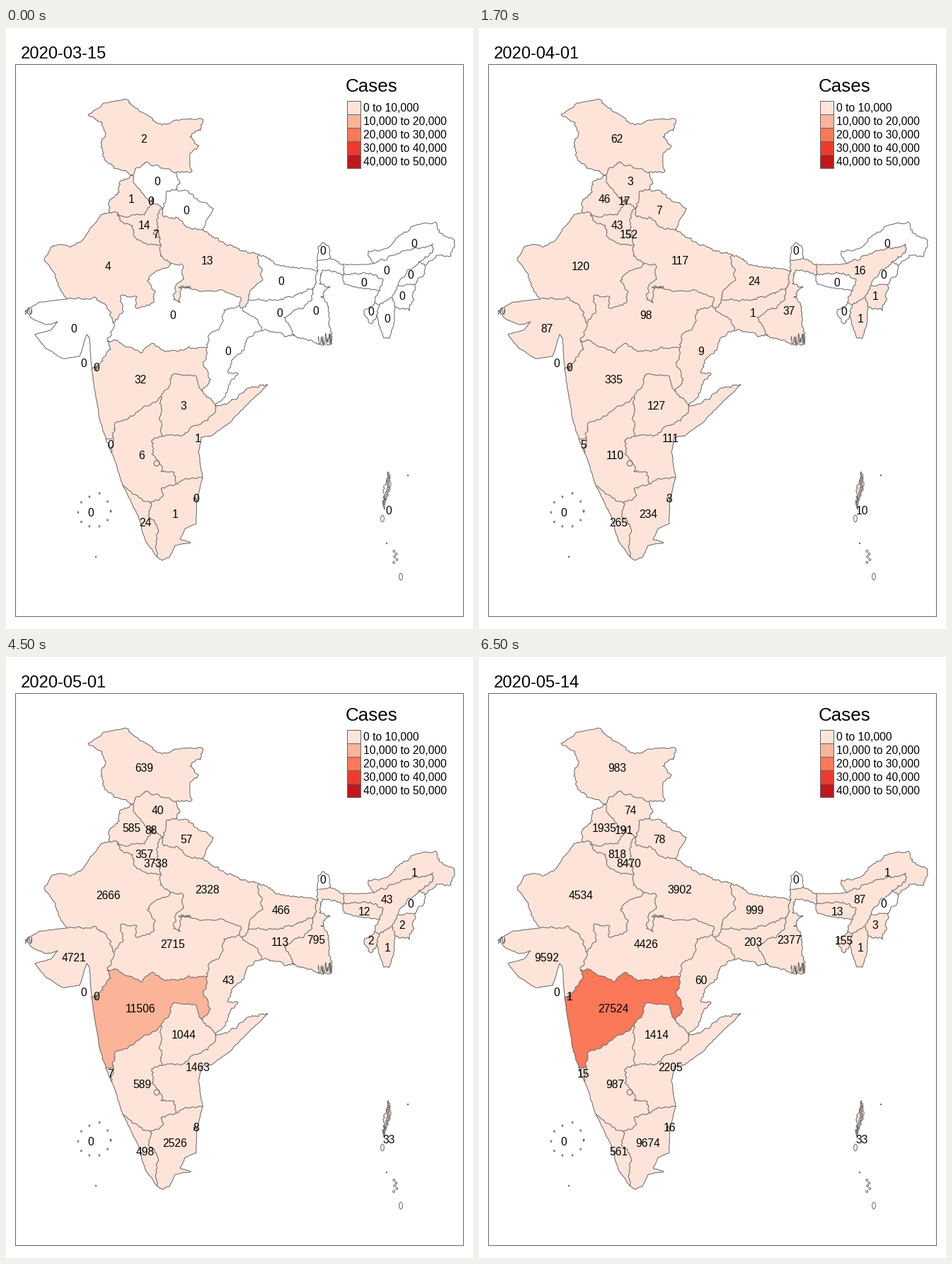
A matplotlib script that plays this animation: 660 by 849 pixels, repeating every 8000 ms.

```python
import numpy as np
import matplotlib.pyplot as plt
from matplotlib.animation import FuncAnimation
from matplotlib.collections import LineCollection, PolyCollection
from matplotlib.patches import Rectangle

W, H, DPI = 660, 849, 64
PT = 72 / DPI  # points per pixel
GREY = "#666666"
REDS = ["#FEE4D8", "#FCB499", "#FB7858", "#EE3A2C", "#C2161B"]
BIN = 10000
DATES = ["2020-03-15", "2020-04-01", "2020-04-15", "2020-05-01", "2020-05-14"]
FIRST, HOLD = 500, 2000
STEP, LOOP = 500, 8000

rng = np.random.default_rng(4)
plt.rcParams["font.family"] = "Liberation Sans"
fig = plt.figure(figsize=(W / DPI, H / DPI), dpi=DPI, facecolor="white")
ax = fig.add_axes([0, 0, 1, 1], xlim=(0, W), ylim=(H, 0))
ax.axis("off")

lines, states = [], []


def arc(*xy, wiggle=1.8):
    """Border through a few key points, made ragged by midpoint displacement."""
    pts = np.reshape(xy, (-1, 2)).astype(float)
    while np.hypot(*np.diff(pts, axis=0).T).mean() > 3.2:
        d = np.diff(pts, axis=0)
        length = np.hypot(*d.T)[:, None]
        normal = np.column_stack((-d[:, 1], d[:, 0])) / length
        shift = rng.uniform(-1, 1, length.shape) * np.minimum(wiggle, 0.35 * length)
        fine = np.empty((2 * len(pts) - 1, 2))
        fine[::2] = pts
        fine[1::2] = pts[:-1] + d / 2 + normal * shift
        pts = fine
    lines.append(pts)
    return pts


def coast(*xy):
    return arc(*xy, wiggle=0.5)


def gap(p, q):
    return np.hypot(*(p - q))


def ring(arcs):
    """Join arcs end to end, turning each one round where needed."""
    pts = arcs[0]
    if len(arcs) > 1:
        ends = arcs[1][[0, -1]]
        if min(gap(pts[0], e) for e in ends) < min(gap(pts[-1], e) for e in ends):
            pts = pts[::-1]
    for a in arcs[1:]:
        if gap(a[-1], pts[-1]) < gap(a[0], pts[-1]):
            a = a[::-1]
        pts = np.vstack((pts, a))
    return pts


def text(x, y, s, size, ha="left"):
    return ax.text(x, y + 0.345 * size, s, size=size * PT, ha=ha, va="baseline", zorder=5)


def state(x, y, *arcs, counts=(0,) * len(DATES)):
    label = text(x, y, "", 15.6, ha="center")
    states.append((label, counts, ring(arcs) if arcs else np.full((3, 2), -9.0)))


def islet(x, y, rx=1.0, ry=1.2):
    t = np.linspace(0, 2 * np.pi, 9)
    lines.append(np.column_stack((x + rx * np.cos(t), y + ry * np.sin(t))))


def clump(x, y, rx, ry):
    """Dense zigzag of tiny creeks around a centre."""
    xs = np.arange(x - rx, x + rx, 0.7)
    lines.append(np.column_stack((xs, y + rng.uniform(-ry, ry, len(xs)))))


# North
jk_out = arc(178, 208, 152, 198, 139, 186, 134, 168, 140, 152, 136, 134, 116, 122,
             138, 106, 173, 102, 183, 113, 203, 125, 220, 137, 248, 129, 278, 129,
             275, 145, 260, 154, 272, 167, 260, 181, 263, 202, 240, 204)
jk_hp = arc(178, 208, 186, 197, 199, 189, 222, 198, 240, 204)
hp_out = arc(240, 204, 246, 219, 240, 228)
hp_uk = arc(240, 228, 226, 233, 222, 254)
hp_pb = arc(178, 208, 184, 223, 206, 245)
hp_hr = arc(206, 245, 222, 254)
pb_out = arc(178, 208, 161, 217, 160, 232, 147, 242, 146, 260)
pb_rj = arc(146, 260, 158, 262)
pb_hr = arc(158, 262, 168, 267, 196, 264, 206, 245)
hr_rj = arc(158, 262, 162, 273, 179, 279, 180, 292, 198, 304, 219, 306)
hr_up = arc(222, 254, 213, 270, 214, 285, 219, 306)
dl = arc(214, 285, 208, 291, 218, 298)
uk_out = arc(240, 228, 257, 230, 266, 240, 293, 255, 277, 285)
uk_up = arc(222, 254, 223, 267, 240, 267, 262, 284, 277, 285)
up_np = arc(277, 285, 304, 302, 332, 315, 357, 320)
rj_out = arc(146, 260, 134, 264, 117, 287, 106, 302, 92, 309, 76, 306, 64, 309,
             54, 327, 70, 349, 75, 366, 86, 383, wiggle=1)
rj_up = arc(219, 306, 218, 322, 232, 334)

# Centre
rj_mp = arc(232, 334, 203, 351, 200, 358, 211, 372, 208, 388, 184, 396, 185, 380,
            163, 377, 166, 400, 152, 417)
rj_gj = arc(86, 383, 124, 380, 147, 400, 152, 417)
up_mp = arc(232, 334, 249, 334, 251, 355, 239, 366, 237, 384, 246, 388, 248, 364,
            270, 370, 308, 371, 330, 380, 330, 392)
up_cg = arc(330, 392, 334, 396)
up_jh = arc(334, 396, 343, 384)
up_br = arc(343, 384, 345, 371, 363, 356, 357, 334, 357, 320)
gj_mp = arc(152, 417, 149, 432, 143, 443)
gj_mh = arc(143, 443, 148, 454, 137, 470, 121, 482)
gj_out = coast(86, 383, 48, 387, 27, 400, 39, 412, 58, 419, 73, 415, 63, 427, 41, 433,
               56, 452, 80, 467, 104, 464, 114, 433, 118, 438, 121, 482)
mp_cg = arc(330, 392, 308, 398, 302, 423, 287, 433, 284, 452)
mp_mh = arc(284, 452, 258, 450, 245, 456, 223, 456, 205, 446, 190, 459, 157, 441,
            143, 443)
mh_out = coast(121, 482, 131, 545, 141, 580)
mh_cg = arc(277, 513, 289, 497, 279, 476, 284, 452)
mh_ts = arc(219, 521, 233, 500, 236, 489, 268, 491, 277, 513)
mh_ka = arc(152, 580, 153, 561, 180, 548, 219, 521)
mh_ga = arc(141, 580, 152, 580)
cg_ts = arc(296, 534, 277, 513)
cg_jh = arc(334, 396, 356, 412, 361, 428)
cg_out = arc(361, 428, 341, 438, 337, 453, 322, 466, 313, 486, 328, 488, 317, 500,
             309, 522, 296, 534)

# South
ga_out = coast(141, 580, 149, 600)
ga_ka = arc(149, 600, 152, 580)
ts_ka = arc(219, 521, 217, 550, 220, 577)
ts_ap = arc(220, 577, 250, 575, 265, 562, 285, 555, 296, 543, 296, 534)
ap_od = arc(296, 534, 322, 525, 345, 508, 370, 504)
ap_out = coast(370, 504, 338, 535, 319, 555, 291, 576, 276, 578, 272, 598, 278, 635)
ap_ka = arc(220, 577, 206, 582, 206, 602, 219, 617, 219, 626, 238, 628, 240, 644)
ap_tn = arc(278, 635, 254, 636, 240, 644)
ka_tn = arc(240, 644, 219, 651, 222, 661, 204, 671)
ka_kl = arc(204, 671, 188, 664, 165, 646)
ka_out = coast(149, 600, 157, 620, 165, 646)
kl_out = coast(165, 646, 187, 690, 196, 722, 213, 747)
kl_tn = arc(204, 671, 204, 693, 213, 703, 213, 747)
tn_out = coast(278, 635, 270, 665, 269, 700, 253, 707, 246, 722, 261, 727, 239, 731,
               231, 748, 220, 752, 213, 747)

# East
br_np = arc(357, 320, 378, 330, 408, 339, 441, 342)
br_wb = arc(441, 342, 438, 357, 434, 367)
br_jh = arc(343, 384, 386, 384, 408, 378, 434, 367)
jh_wb = arc(434, 367, 430, 386, 393, 409, 408, 435)
jh_od = arc(361, 428, 392, 434, 408, 435)
wb_od = arc(408, 435, 426, 441, 441, 447)
wb_sea = arc(441, 447, 460, 447)
wb_bd = arc(476, 349, 447, 342, 443, 361, 458, 366, 445, 380, 456, 396, 460, 447)
wb_np = arc(440, 328, 441, 342)
wb_bt = arc(458, 325, 476, 334)
sk_wb = arc(440, 328, 458, 325)
sk_out = arc(440, 328, 441, 309, 448, 303, 456, 308, 458, 325, wiggle=1)

# North-east
as_wb = arc(476, 334, 476, 349)
as_bt = arc(476, 334, 520, 333, wiggle=0.7)
as_ar = arc(520, 333, 545, 321, 575, 312, 603, 305, 603, 317, 583, 331)
as_nl = arc(583, 331, 567, 343, 554, 364)
as_mn = arc(554, 364, 546, 381)
as_mz = arc(546, 381, 528, 391)
as_tr = arc(528, 391, 521, 387)
as_bd = arc(521, 387, 528, 371)
as_ml = arc(528, 371, 533, 356, 515, 346, 476, 349)
ml_bd = arc(476, 349, 478, 362, 505, 368, 528, 371, wiggle=1)
ar_out = arc(520, 333, 512, 315, 535, 312, 556, 293, 572, 281, 607, 274, 614, 290,
             634, 300, 629, 322, 608, 321, 592, 336)
ar_nl = arc(583, 331, 592, 336)
nl_out = arc(592, 336, 587, 352, 578, 362)
nl_mn = arc(554, 364, 578, 362)
mn_out = arc(578, 362, 570, 399, 550, 394)
mn_mz = arc(546, 381, 550, 394)
mz_out = arc(550, 394, 548, 420, 542, 438, 534, 438, 524, 406, wiggle=1)
mz_tr = arc(528, 391, 524, 406)
tr_out = arc(524, 406, 516, 418, 506, 401, 521, 387)

# Islands and dense fragments
an_main = arc(541, 627, 544, 645, 535, 680, 535, 650, 541, 627)
for y in np.linspace(632, 672, 14):
    islet(541.5 - (y - 630) / 6 + rng.uniform(-2, 2), y, 1.5, 2)
for y in np.linspace(739, 755, 5):
    islet(551 + rng.uniform(-3, 3), y, 1.5, 1.5)
for a in np.linspace(0, 2 * np.pi, 11):
    islet(125 + 23 * np.cos(a), 681 + 22 * np.sin(a) + rng.uniform(-4, 4), 0.9, 1.2)
for x, y in [(532, 693), (558, 775)]:
    islet(x, y, 2.5, 5)
for x, y in [(127, 747), (568, 632), (538, 728)]:
    islet(x, y, 0.8, 0.8)
islet(213, 615, 4, 4)
clump(451, 440, 10, 9)
clump(32, 400, 5, 5)
clump(253, 366, 9, 2)
for x, y in [(268, 665), (127, 480), (206, 244)]:
    clump(x, y, 3, 4)

# States: label position, borders, cases on each date
state(195, 157, jk_out, jk_hp, counts=(2, 62, 300, 639, 983))
state(214, 217, jk_hp, hp_out, hp_uk, hp_hr, hp_pb, counts=(0, 3, 35, 40, 74))
state(177, 242, pb_out, pb_rj, pb_hr, hp_pb, counts=(1, 46, 186, 585, 1935))
state(205, 245, counts=(0, 17, 21, 88, 191))
state(255, 258, uk_out, uk_up, hp_uk, counts=(0, 7, 37, 57, 78))
state(195, 279, pb_hr, hp_hr, hr_up, hr_rj, counts=(14, 43, 204, 357, 818))
state(212, 292, dl, counts=(7, 152, 1578, 3738, 8470))
state(144, 337, rj_out, rj_gj, rj_mp, rj_up, hr_rj, pb_rj,
      counts=(4, 120, 1076, 2666, 4534))
state(284, 329, hr_up, uk_up, up_np, up_br, up_jh, up_cg, up_mp, rj_up,
      counts=(13, 117, 735, 2328, 3902))
state(389, 358, br_np, br_wb, br_jh, up_br, counts=(0, 24, 72, 466, 999))
state(448, 315, sk_out, sk_wb)
state(577, 305, ar_out, ar_nl, as_ar, counts=(0, 0, 1, 1, 1))
state(538, 343, as_bt, as_ar, as_nl, as_mn, as_mz, as_tr, as_bd, as_ml, as_wb,
      counts=(0, 16, 33, 43, 87))
state(572, 349, as_nl, nl_mn, nl_out, ar_nl)
state(506, 360, as_ml, ml_bd, counts=(0, 0, 7, 12, 13))
state(560, 379, nl_mn, mn_out, mn_mz, as_mn, counts=(0, 1, 2, 2, 3))
state(516, 401, as_tr, mz_tr, tr_out, counts=(0, 0, 2, 2, 155))
state(539, 411, as_mz, mn_mz, mz_out, mz_tr, counts=(0, 1, 1, 1, 1))
state(438, 400, wb_np, sk_wb, wb_bt, as_wb, wb_bd, wb_sea, wb_od, jh_wb, br_wb,
      counts=(0, 37, 213, 795, 2377))
state(387, 403, br_jh, jh_wb, jh_od, cg_jh, up_jh, counts=(0, 1, 28, 113, 203))
state(236, 406, rj_mp, up_mp, mp_cg, mp_mh, gj_mp, counts=(0, 98, 938, 2715, 4426))
state(96, 425, gj_out, gj_mh, gj_mp, rj_gj, counts=(0, 87, 766, 4721, 9592))
state(110, 474)
state(128, 480, counts=(0, 0, 0, 0, 1))
state(314, 457, mp_cg, up_cg, cg_jh, cg_out, cg_ts, mh_cg, counts=(0, 9, 33, 43, 60))
state(190, 497, mh_out, mh_ga, mh_ka, mh_ts, mh_cg, mp_mh, gj_mh,
      counts=(32, 335, 2916, 11506, 27524))
state(251, 534, mh_ts, cg_ts, ts_ap, ts_ka, counts=(3, 127, 650, 1044, 1414))
state(271, 580, ts_ap, ap_od, ap_out, ap_tn, ap_ka, counts=(1, 111, 525, 1463, 2205))
state(148, 589, ga_out, ga_ka, mh_ga, counts=(0, 5, 7, 7, 15))
state(192, 604, mh_ka, ts_ka, ap_ka, ka_tn, ka_kl, ka_out, ga_ka,
      counts=(6, 110, 279, 589, 987))
state(269, 665, counts=(0, 3, 7, 8, 16))
state(197, 699, ka_kl, kl_tn, kl_out, counts=(24, 265, 388, 498, 561))
state(239, 687, ap_tn, tn_out, kl_tn, ka_tn, counts=(1, 234, 1242, 2526, 9674))
state(120, 685)
state(541, 682, an_main, counts=(0, 10, 11, 33, 33))

fills = PolyCollection([s[2] for s in states], edgecolors="none", zorder=1)
ax.add_collection(fills)
ax.add_collection(LineCollection(lines, colors=GREY, linewidths=PT, zorder=2))

ax.add_patch(Rectangle((13, 51), 633, 780, fill=False, ec=GREY, lw=PT))
title = text(20.5, 34.5, "", 23.8)
text(480, 81, "Cases", 26)
for k, colour in enumerate(REDS):
    y = 103 + 19 * k
    ax.add_patch(Rectangle((482, y), 19, 19, fc=colour, ec=GREY, lw=PT))
    text(505, y + 10, f"{k * BIN:,} to {(k + 1) * BIN:,}", 15.6)


def shade(count):
    return REDS[count // BIN] if count else "white"


def update(i):
    day = (i * STEP - FIRST) // HOLD + 1
    title.set_text(DATES[day])
    for label, counts, _ in states:
        label.set_text(str(counts[day]))
    fills.set_facecolor([shade(counts[day]) for _, counts, _ in states])
    return [title, fills]


anim = FuncAnimation(fig, update, frames=LOOP // STEP, interval=STEP, repeat=True)
plt.show()
```
